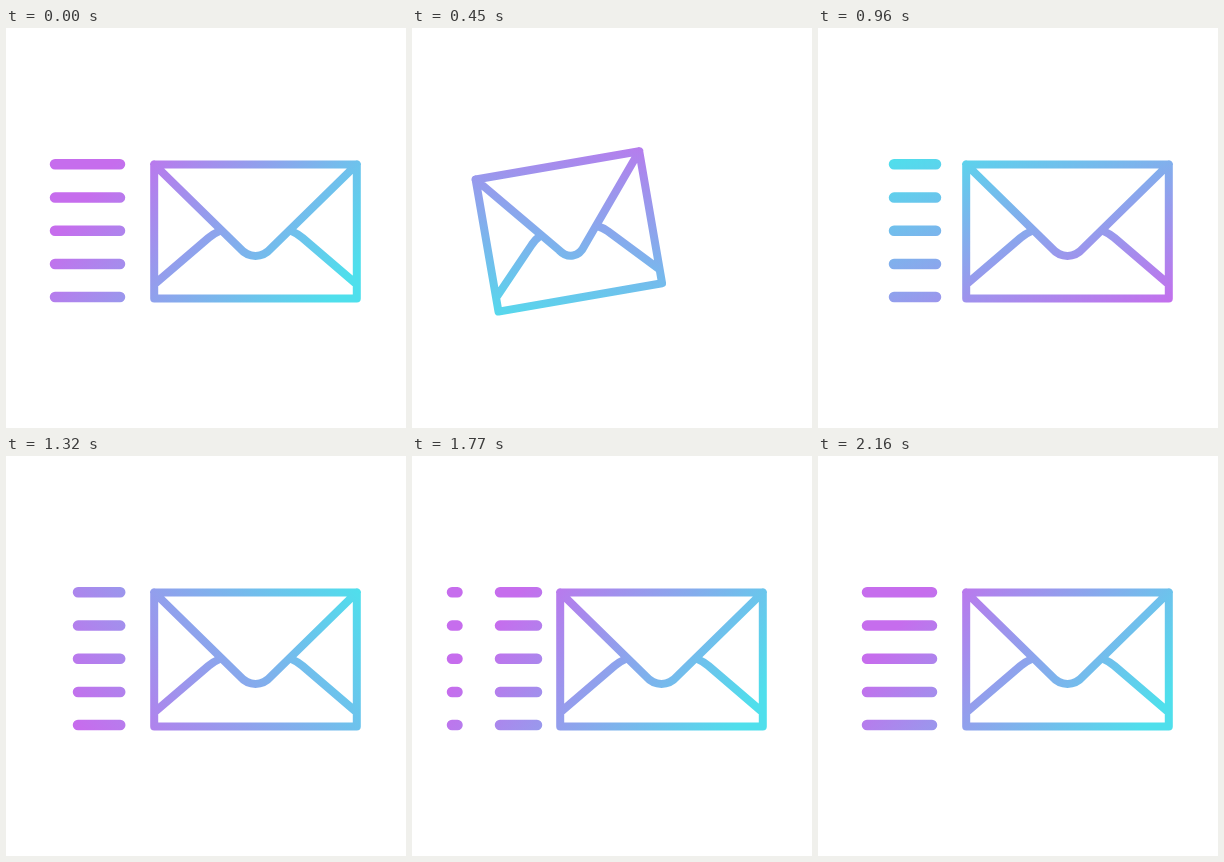
An HTML page with a canvas that plays this animation: 400 px wide and 400 px high, repeating every 4190 ms.

```html
<!DOCTYPE html>
<html lang="en">
<head>
<meta charset="utf-8">
<title>Sending mail</title>
<style>
  html, body { margin: 0; width: 100%; height: 100%; overflow: hidden; background: #fff; }
  canvas { display: block; width: 400px; height: 400px; }
</style>
</head>
<body>
<canvas id="stage"></canvas>
<script>
const LOOP = 4190, ACTIVE = 2160, STEP = 30;
const PURPLE = '#c66ded', CYAN = '#4fdfec';
const TRACK = { left: 40, length: 85 };
const ROWS = [136.3, 169.6, 202.8, 236, 269];
const CENTER = { x: 249.5, y: 203.4 };

// [time, value] keys
const gradientAngle = [[0, 39], [450, 100], [720, 188], [960, 250], [1320, 327], [1770, 396], [2160, 399]];
const gradientRadius = [[0, 127], [450, 119], [720, 150], [960, 118], [1320, 155], [1770, 128], [2160, 127]];
const dashStart = [[600, 110], [720, 73], [960, -9], [1320, -98], [1770, -167], [2160, -206]];
const dashLength = [[0, 65], [300, 0], [690, 0], [720, 2], [960, 42], [1770, 42.5], [2160, 65]];

const canvas = document.getElementById('stage');
const ctx = canvas.getContext('2d');
const ratio = window.devicePixelRatio || 1;
canvas.width = canvas.height = 400 * ratio;

// Monotone cubic interpolation, flat at both ends
function sample(keys, t) {
  const last = keys.length - 1;
  if (t <= keys[0][0]) return keys[0][1];
  if (t >= keys[last][0]) return keys[last][1];
  const slope = i => (keys[i + 1][1] - keys[i][1]) / (keys[i + 1][0] - keys[i][0]);
  const tangent = i => {
    if (i === 0 || i === last) return 0;
    const a = slope(i - 1), b = slope(i);
    return a * b > 0 ? 2 * a * b / (a + b) : 0;
  };
  const i = keys.findIndex(k => k[0] > t) - 1;
  const [t0, v0] = keys[i], [t1, v1] = keys[i + 1];
  const span = t1 - t0, u = (t - t0) / span;
  const blend = u * u * (3 - 2 * u);
  return v0 + (v1 - v0) * blend
    + span * u * (1 - u) * ((1 - u) * tangent(i) - u * tangent(i + 1));
}

function easeInOut(u) {
  u = Math.min(1, Math.max(0, u));
  return u < 0.5 ? 4 * u ** 3 : 1 - 4 * (1 - u) ** 3;
}

function makeGradient(t) {
  const angle = sample(gradientAngle, t) * Math.PI / 180;
  const radius = sample(gradientRadius, t);
  const dx = radius * Math.cos(angle), dy = radius * Math.sin(angle);
  const gradient = ctx.createLinearGradient(216 - dx, 204 - dy, 216 + dx, 204 + dy);
  gradient.addColorStop(0, PURPLE);
  gradient.addColorStop(1, CYAN);
  return gradient;
}

function drawLines(t) {
  const length = sample(dashLength, t);
  if (length < 0.1) return;
  const offset = (t < 600 ? 49 : sample(dashStart, t)) - TRACK.left;
  const start = TRACK.left + ((offset % TRACK.length) + TRACK.length) % TRACK.length;
  const right = TRACK.left + TRACK.length;
  const end = start + length;
  ctx.beginPath();
  for (const y of ROWS) {
    ctx.moveTo(start, y);
    ctx.lineTo(Math.min(end, right), y);
    if (end > right) {
      ctx.moveTo(TRACK.left, y);
      ctx.lineTo(end - TRACK.length, y);
    }
  }
  ctx.lineWidth = 10.5;
  ctx.stroke();
}

function drawEnvelope(t) {
  const away = t < 540 ? easeInOut(t / 540) : 1 - easeInOut((t - 540) / 247);
  ctx.save();
  ctx.translate(CENTER.x - 94.4 * away, CENTER.y);
  ctx.rotate(-10 * away * Math.PI / 180);
  ctx.scale(1 - 0.184 * away, 1);
  ctx.beginPath();
  ctx.rect(-101.3, -67, 202.6, 134);
  ctx.moveTo(-101.3, -67);
  ctx.lineTo(-15.5, 17);
  ctx.bezierCurveTo(-7, 27, 7, 27, 15.5, 17);
  ctx.lineTo(101.3, -67);
  for (const side of [-1, 1]) {
    ctx.moveTo(side * 99.5, 51.5);
    ctx.lineTo(side * 47, 6.5);
    ctx.quadraticCurveTo(side * 41.5, 2, side * 36.5, 0);
  }
  // The gradient and line weight stay in stage space
  ctx.restore();
  ctx.lineWidth = 8;
  ctx.stroke();
}

function draw(now) {
  const t = Math.min(ACTIVE, Math.floor((now % LOOP) / STEP) * STEP);
  ctx.setTransform(ratio, 0, 0, ratio, 0, 0);
  ctx.fillStyle = '#fff';
  ctx.fillRect(0, 0, 400, 400);
  ctx.lineCap = ctx.lineJoin = 'round';
  ctx.strokeStyle = makeGradient(t);
  drawLines(t);
  drawEnvelope(t);
}

const origin = performance.now();
function tick() {
  draw(performance.now() - origin);
  requestAnimationFrame(tick);
}
tick();
</script>
</body>
</html>
```
